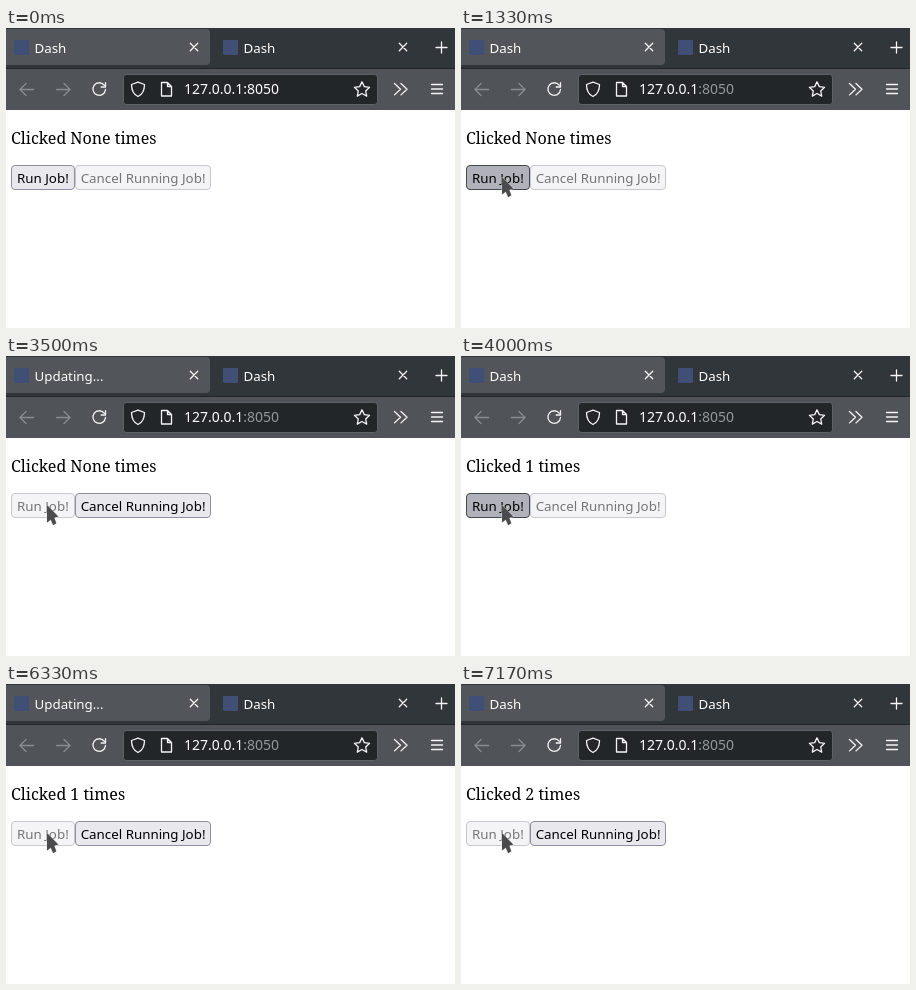
Recreate the animation shown at these times as an HTML page. Size 449 by 300 pixels, loop 8000 ms.

```html
<!DOCTYPE html>
<html lang="en">
<head>
<meta charset="utf-8">
<title>Background job</title>
<style>
html, body { margin: 0; width: 100%; height: 100%; overflow: hidden; background: #fff; }
svg { display: block; width: 449px; height: 300px; }
text { font: 13.333px "Noto Sans", sans-serif; white-space: pre; }
.ui { fill: #fcfcfc; }
.url { font-size: 14px; }
.head { font: 16px "Noto Serif", serif; }
.icon { fill: none; stroke: #f4f4f5; stroke-width: 1.3; stroke-linecap: round; stroke-linejoin: round; }
.off { stroke: #898c8f; }
.btn rect { fill: #e9e9ed; stroke: #8f8f9d; }
.btn.hover rect { fill: #d0d0d7; stroke: #676774; }
.btn.active rect { fill: #b1b1b9; stroke: #484851; }
.btn.disabled rect { fill: #f4f4f6; stroke: #c7c7ce; }
.btn.disabled text { fill: #757577; }
</style>
</head>
<body>
<svg viewBox="0 0 449 300">
  <defs>
    <path id="close" class="icon" d="M0 0l7.4 7.4M7.4 0l-7.4 7.4"/>
    <rect id="badge" width="15" height="15" rx="1" fill="#3f4f75"/>
  </defs>

  <rect width="449" height="41" fill="#31363b"/>
  <rect x="-4" y="1" width="208" height="36" rx="4" fill="#52555a"/>
  <rect y="40" width="449" height="42" fill="#505459"/>
  <rect y="40" width="449" height="1" fill="#222529"/>
  <use href="#badge" x="8" y="12"/>
  <use href="#badge" x="217" y="12"/>
  <text id="title" class="ui" x="28.5" y="25">Dash</text>
  <text class="ui" x="237.5" y="25">Dash</text>
  <use href="#close" x="184.3" y="15.3"/>
  <use href="#close" x="393.3" y="15.3"/>
  <path class="icon" d="M430 19.5h11M435.500 14v11"/>

  <path class="icon off" d="M27.500 61.500h-13M20 55.500l-6 6l6 6M50.500 61.500h13M58 55.500l6 6l-6 6"/>
  <path class="icon" d="M98.200 57.200A6.300 6.300 0 1 0 99.500 61.500M99.500 54.700v4.300h-4.300"/>
  <rect x="117.500" y="46.500" width="254" height="30" rx="3" fill="#232629" stroke="#5f6368"/>
  <path class="icon" d="M132 54.200l6.500 2.300c0 5-1 9.500-6.500 12c-5.500-2.500-6.500-7-6.500-12z"/>
  <path class="icon" d="M155.500 54.500h6l4 4v9.500h-10zM161.500 54.500v4h4"/>
  <text class="ui url" x="178" y="66">127.0.0.1<tspan id="port">:8050</tspan></text>
  <path class="icon" d="M356 53.800l2.300 4.800l5.300 .7l-3.900 3.600l1 5.200l-4.700-2.600l-4.700 2.600l1-5.200l-3.900-3.600l5.300-.7z"/>
  <path class="icon" d="M388.500 55.500l6 5.700l-6 5.700M395 55.500l6 5.700l-6 5.700"/>
  <path class="icon" d="M425.500 56.500h11M425.500 61h11M425.500 65.500h11"/>

  <text id="count" class="head" x="5" y="116">Clicked None times</text>
  <g id="run" class="btn">
    <rect x="5.500" y="137.500" width="63" height="24" rx="3.500"/>
    <text x="11" y="155">Run Job!</text>
  </g>
  <g id="cancel" class="btn disabled">
    <rect x="69.500" y="137.500" width="135" height="24" rx="3.500"/>
    <text x="74.700" y="155">Cancel Running Job!</text>
  </g>
  <path id="cursor" d="M0 0V17.500L3.800 14.800L6.200 20.200L9.300 18.300L7.300 12.800L11.300 11.500Z"
    fill="#4b4b4d" stroke="#e4e4e6" stroke-width=".8" paint-order="stroke" visibility="hidden"/>
</svg>
<script>
const LOOP = 8000, start = performance.now();
const $ = id => document.getElementById(id);

// [time, changed state]
const events = [
  [0, { title: "Dash", count: "None", run: "", cancel: "disabled", port: "#fcfcfc" }],
  [1070, { run: "hover" }],
  [1330, { run: "active", port: "#949799" }],
  [1470, { run: "hover", title: "Updating..." }],
  [1530, { run: "disabled", cancel: "", title: "Dash" }],
  [2500, { title: "Updating..." }],
  [2570, { title: "Dash" }],
  [3500, { title: "Updating..." }],
  [3570, { title: "Dash", count: 1, run: "hover", cancel: "disabled" }],
  [4000, { run: "active" }],
  [4170, { run: "hover", title: "Updating..." }],
  [4370, { run: "disabled", cancel: "", title: "Dash" }],
  [5370, { title: "Updating..." }],
  [5500, { title: "Dash" }],
  [6330, { title: "Updating..." }],
  [6400, { title: "Dash", count: 2, run: "hover", cancel: "disabled" }],
  [6770, { run: "active" }],
  [6930, { run: "hover", title: "Updating..." }],
  [7170, { run: "disabled", cancel: "", title: "Dash" }]
];

// [time, x, y] of the pointer tip
const path = [
  [370, 215, 12], [430, 193, 62], [500, 160, 124], [570, 131, 163], [630, 111, 178],
  [700, 80, 178], [770, 59, 168], [930, 58, 166], [1000, 52, 162], [1070, 46, 156], [1170, 41, 149]
];

function pointer(t) {
  const tick = Math.floor((t + 4) / 33.333) * 33.333;
  const time = Math.max(tick, path[0][0]);
  const i = path.findIndex(p => p[0] > time);
  if (i < 0) return path[path.length - 1].slice(1);
  const [a, b] = [path[i - 1], path[i]];
  const k = (time - a[0]) / (b[0] - a[0]);
  return [1, 2].map(n => Math.round(a[n] + (b[n] - a[n]) * k));
}

function draw(now) {
  const t = Math.max(0, now - start) % LOOP;
  const s = Object.assign({}, ...events.filter(e => e[0] <= t).map(e => e[1]));
  $("title").textContent = s.title;
  $("count").textContent = `Clicked ${s.count} times`;
  $("port").style.fill = s.port;
  $("run").setAttribute("class", "btn " + s.run);
  $("cancel").setAttribute("class", "btn " + s.cancel);
  const shown = t >= path[0][0];
  $("cursor").setAttribute("visibility", shown ? "visible" : "hidden");
  if (shown) $("cursor").setAttribute("transform", `translate(${pointer(t)})`);
  requestAnimationFrame(draw);
}
draw(start);
</script>
</body>
</html>
```
